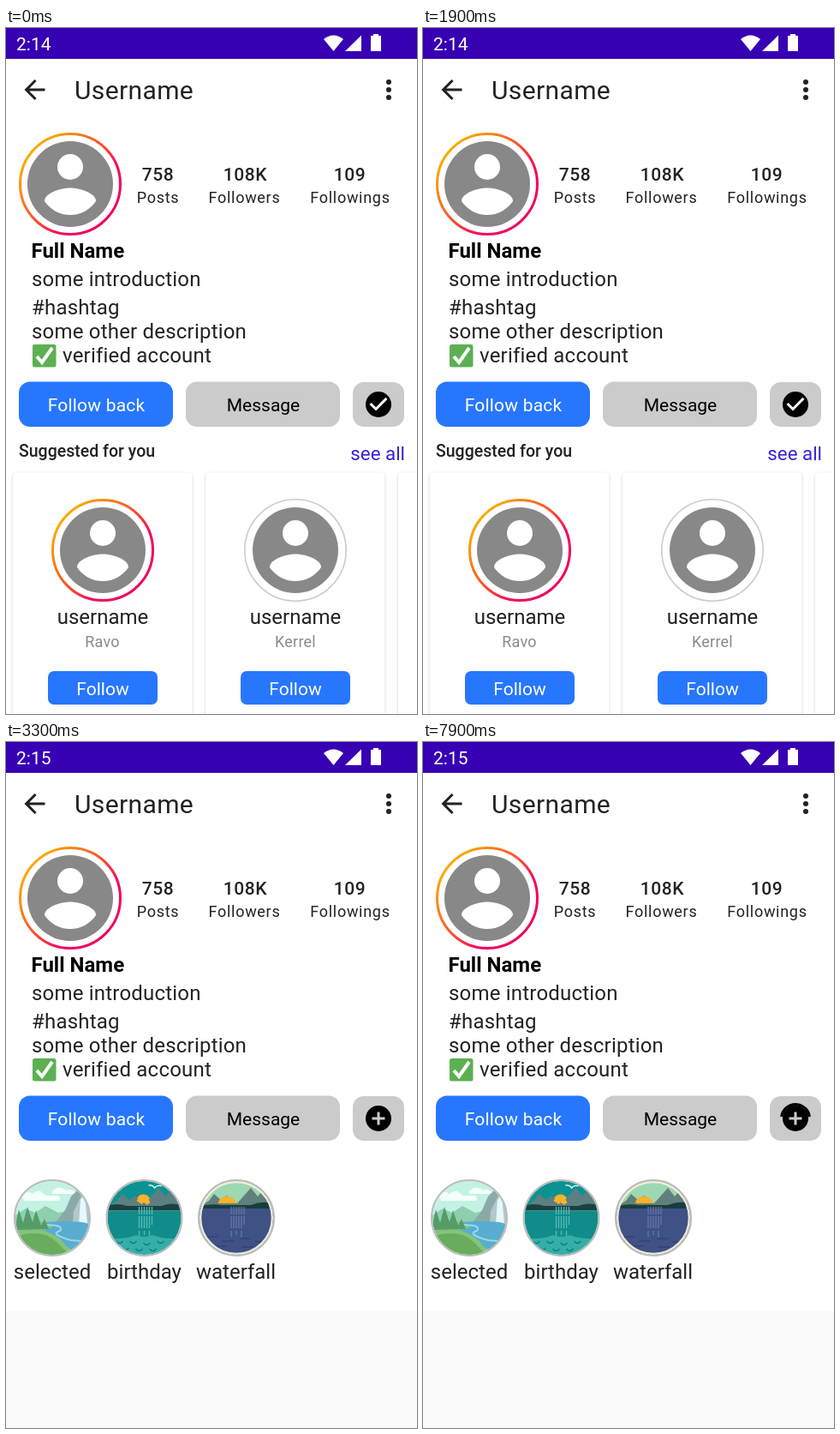
An HTML page that plays this animation: 480x800 px, repeating every 8 s.

```html
<!DOCTYPE html>
<html lang="en">
<head>
<meta charset="utf-8">
<title>Profile screen</title>
<style>
html, body { margin: 0; height: 100%; overflow: hidden; background: #fff; }
svg { display: block; width: 480px; height: 800px; font: 24px Roboto, sans-serif; fill: #222; }
.mid { text-anchor: middle; }
.num { font-size: 21px; font-weight: 500; letter-spacing: .6px; }
.cap { font-size: 18px; letter-spacing: .7px; }
.bio { letter-spacing: .2px; }
.btn { font-size: 21px; }
.sub { font-size: 18px; letter-spacing: .2px; fill: #8a8a8a; }
.blue { fill: #2777fe; }
.gray { fill: #cbcbcb; }
.white { fill: #fff; }
.card { fill: #fff; filter: drop-shadow(0 1px 1.5px #0003); }
.ring { fill: none; stroke: #bbb; stroke-width: 2; }
</style>
</head>
<body>
<svg viewBox="0 0 480 800">
  <defs>
    <linearGradient id="warm" x1=".1" y1=".15" x2=".9" y2=".85">
      <stop stop-color="#fcb000"/><stop offset=".5" stop-color="#fb4a30"/><stop offset=".75" stop-color="#f5055c"/><stop offset="1" stop-color="#f00060"/>
    </linearGradient>
    <clipPath id="disc"><circle r="43"/></clipPath>
    <g id="person">
      <circle r="50" fill="#888"/>
      <circle cy="-20" r="15" fill="#fff"/>
      <path d="M0 36c-12.5 0-23.5-6.4-30-16.1 .2-10 20-15.4 30-15.4s29.8 5.4 30 15.4C23.5 29.600 12.500 36 0 36z" fill="#fff"/>
    </g>
    <g id="story">
      <circle r="58.500" fill="none" stroke="url(#warm)" stroke-width="3"/>
      <use href="#person"/>
    </g>
    <g id="cardBody">
      <rect class="card" x="8" y="518.500" width="209.500" height="300" rx="4"/>
      <text class="mid" x="113" y="695">username</text>
      <rect class="blue" x="49" y="750" width="128" height="39" rx="7"/>
      <text class="mid btn white" x="113" y="778">Follow</text>
    </g>
    <g id="peaks">
      <path d="M-45-12l13-8 6-8 8 7 7-5 6 6 6 3 7-8 9-10 8 10 6-7 14 14v10h-90z"/>
    </g>
    <g id="falls" fill="none" stroke-width="1.300">
      <path d="M-6-13V22M-3-13V12M0-13V20M3-13V14M6-13V23M9-13V8" stroke-dasharray="9 2 14 3"/>
    </g>
  </defs>

  <rect width="480" height="800" fill="#fff"/>
  <rect width="480" height="36" fill="#3700b3"/>
  <text id="clock" class="btn white" x="12" y="26"></text>
  <path class="white" d="M371 13Q382.500 4 394 13L382.500 27zM415 8.500V27H396zM429 9v-2h6v2h3v18h-12v-18z"/>

  <path transform="translate(15.500 54) scale(1.500)" d="M20 11H7.830l5.590-5.590L12 4l-8 8 8 8 1.410-1.410L7.830 13H20z"/>
  <text x="80" y="83" font-size="30" letter-spacing=".375">Username</text>
  <circle cx="447" cy="63" r="3"/><circle cx="447" cy="72" r="3"/><circle cx="447" cy="81" r="3"/>

  <use href="#story" x="75" y="182"/>
  <g class="mid">
    <text class="num" x="177.500" y="178">758</text><text class="cap" x="177.500" y="204">Posts</text>
    <text class="num" x="279.500" y="178">108K</text><text class="cap" x="278.500" y="204">Followers</text>
    <text class="num" x="401.500" y="178">109</text><text class="cap" x="402" y="204">Followings</text>
  </g>
  <text x="29.500" y="268" font-weight="700" fill="#000">Full Name</text>
  <text class="bio" x="30" y="301">some introduction<tspan id="more">...<tspan fill="#888">more</tspan></tspan></text>

  <g id="bio" class="bio">
    <text x="30" y="334">#hashtag</text>
    <text x="30" y="362">some other description</text>
    <rect x="31" y="369" width="27.500" height="26.500" rx="2.500" fill="#5cb052"/>
    <path d="M36 383l6 7 12-17" fill="none" stroke="#fff" stroke-width="4"/>
    <text x="66" y="390">verified account</text>
  </g>

  <g id="below">
    <rect class="blue" x="15" y="412.500" width="180" height="52.500" rx="13"/>
    <text class="mid btn white" x="105.500" y="447" letter-spacing=".2">Follow back</text>
    <rect class="gray" x="210" y="412.500" width="180" height="52.500" rx="13"/>
    <text class="mid btn" x="300.500" y="447" fill="#000">Message</text>
    <rect class="gray" x="405" y="413" width="60" height="52" rx="13"/>
    <rect id="ripple" x="405" y="413" width="60" height="52" rx="13" fill="#000"/>
    <circle cx="435" cy="439" r="15" fill="#000"/>
    <path id="check" class="gray" style="fill:#f2f2f2" transform="translate(417 421) scale(1.500)" d="M10 17l-5-5 1.410-1.410L10 14.170l7.590-7.590L19 8z"/>
    <path id="plus" class="gray" transform="translate(417 421) scale(1.500)" d="M17 13h-4v4h-2v-4H7v-2h4V7h2v4h4z"/>
    <circle id="spinner" r="16.400" pathLength="1" fill="none" stroke="#000" stroke-width="3.200"/>

    <g id="suggested">
      <text x="15" y="500" font-size="19.500" font-weight="500">Suggested for you</text>
      <text x="466" y="503.500" font-size="22.300" text-anchor="end" fill="#3822d6">see all</text>
      <use href="#cardBody"/><use href="#cardBody" x="225"/><use href="#cardBody" x="450"/>
      <use href="#story" x="113" y="609"/>
      <text class="mid sub" x="112.500" y="722">Ravo</text>
      <circle cx="338" cy="609" r="59.200" fill="none" stroke="#ccc" stroke-width="1.600"/>
      <use href="#person" x="338" y="609"/>
      <text class="mid sub" x="338" y="722">Kerrel</text>
    </g>

    <g id="highlights">
      <rect y="663" width="480" height="240" fill="#fafafa"/>
      <g transform="translate(54 555)">
        <g clip-path="url(#disc)">
          <rect x="-45" y="-45" width="90" height="90" fill="#c3f2e5"/>
          <path d="M-35-25q5-8 12-3 8-8 15 2h15q5 5 0 6h-40zM0-31q8-8 16-1 8-3 12 4H0z" fill="#f3fffb"/>
          <path d="M-45-2l14-9 11 5 12-8 15 8 20-4V18h-72z" fill="#8fcfae"/>
          <path d="M4 5l11-14 7-16 8-8 15 2V16H12z" fill="#8ba9a8"/>
          <path d="M25-8l9-18 8 3 3 30H24z" fill="#b4c8c6"/>
          <path d="M31 8l2-29 5-6 3 35z" fill="#e4f9ff"/>
          <path d="M-45 5Q-10 0 8 12L45 18v27h-90z" fill="#83c47a"/>
          <path d="M-10 5Q40 2 45 9v28Q22 42 15 31T-13 14Q12 12-10 5z" fill="#58add0"/>
          <path d="M-9 8q24 0 18 7-13 4 13 11l22 2" fill="none" stroke="#9bd8e8" stroke-width="2"/>
          <path d="M-45 22Q-12 12 4 27t15 18h-64z" fill="#68ad5d"/>
          <path d="M-44 14l5-24 5 16 5-19 6 18 4-14 6 18 4-8 5 12z" fill="#569b68"/>
        </g>
        <circle class="ring" r="44"/>
      </g>
      <g transform="translate(161.500 555)">
        <g clip-path="url(#disc)">
          <rect x="-45" y="-45" width="90" height="90" fill="#108c8a"/>
          <path d="M-45-45h90v32h-90z" fill="#0c9292"/>
          <circle cx="-1" cy="-19" r="8.500" fill="#fbb12a"/>
          <use href="#peaks" fill="#5e7f82"/>
          <path d="M-9-20q8-13 16 2l-4 3-3-4-3 3z" fill="#fbb12a"/>
          <path d="M-45-14q12-4 25 0h40q12-5 25 0v5h-90z" fill="#174443"/>
          <use href="#falls" stroke="#55bcb7"/>
          <path d="M-45 23q22 3 35-3 10 4 20 0 15 6 35 3v25h-90z" fill="#35aea9"/>
          <path d="M-33 27q4 5 8 0m8 0q4 5 8 0m8 2q4 5 8 0m8-2q4 5 8 0M-26 35q4 5 8 0m8 1q4 5 8 0m8 0q4 5 8 0" fill="none" stroke="#117e7c" stroke-width="1.500"/>
          <path d="M5-38q5-1 7 3 3-4 8-2m-5-4q4 0 5 2 2-3 6-2" fill="none" stroke="#e9ffff" stroke-width="1.300"/>
        </g>
        <circle class="ring" r="44"/>
      </g>
      <g transform="translate(269 555)">
        <g clip-path="url(#disc)">
          <rect x="-45" y="-45" width="90" height="90" fill="#9dd8b2"/>
          <use href="#peaks" fill="#617f7b"/>
          <path d="M-21-17q1-8 10-8t11 8z" fill="#fbb12a"/>
          <path d="M-45-13q15-4 28-2h34q15-6 28-1v6h-90z" fill="#183d3e"/>
          <rect x="-45" y="-11" width="90" height="56" fill="#3f5185"/>
          <use href="#falls" stroke="#627ba6"/>
          <path d="M-34 22h12m5 5h14m7-3h13m5 4h9M-25 33h14m17 1h13" stroke="#304372" stroke-width="1.500"/>
          <circle r="42" fill="none" stroke="#f1eedc" stroke-width="2.500"/>
        </g>
        <circle class="ring" r="44"/>
      </g>
      <g class="mid"><text x="54" y="626">selected</text><text x="161.500" y="626">birthday</text><text x="268.500" y="626">waterfall</text></g>
    </g>
  </g>
  <circle id="touch" r="17" fill="#fff" fill-opacity=".6" stroke="#c3c3ec" stroke-width="2"/>
</svg>
<script>
const $ = id => document.getElementById(id);
const show = (id, on) => $(id).style.display = on ? '' : 'none';
const clamp = v => Math.max(0, Math.min(1, v));

// start, x, y, hold, fade (ms)
const taps = [[3000, 281, 292, 0, 300], [4600, 127, 461, 0, 300], [5100, 241, 443, 0, 300], [6100, 445, 443, 200, 1]];
const CUT = 2100, EXPAND = 3100, LOAD = 6300;

// cubic-bezier(.4, 0, .2, 1)
function ease(x) {
  let lo = 0, hi = 1, s;
  for (let i = 0; i < 20; i++) {
    s = (lo + hi) / 2;
    const bx = 1.2 * s * (1 - s) ** 2 + .6 * s * s * (1 - s) + s ** 3;
    if (bx < x) lo = s; else hi = s;
  }
  return s * s * (3 - 2 * s);
}

function spin(ms) {
  const p = ms % 1333 / 1333;
  const head = .75 * ease(clamp(2 * p)), tail = .75 * ease(clamp(2 * p - 1));
  const angle = 360 * (tail + p / 4) + ms / 4444 * 720 - 90;
  $('spinner').setAttribute('transform', `translate(435 439) rotate(${angle})`);
  $('spinner').setAttribute('stroke-dasharray', `${Math.max(0, head - tail)} 2`);
}

function draw(t) {
  const first = t < CUT, folded = !first && t < EXPAND, loading = t >= LOAD;
  $('clock').textContent = first ? '2:14' : '2:15';
  show('more', folded);
  show('bio', !folded);
  show('suggested', first);
  show('check', first);
  show('highlights', !first);
  show('plus', !first);
  $('below').setAttribute('transform', `translate(0 ${folded ? -89.5 : 0})`);

  const tap = taps.findLast(a => t >= a[0]);
  show('touch', tap);
  if (tap) {
    const [start, x, y, hold, fade] = tap;
    $('touch').setAttribute('transform', `translate(${x} ${y})`);
    $('touch').setAttribute('opacity', clamp(1 - (t - start - hold) / fade));
  }

  show('spinner', loading);
  $('ripple').setAttribute('opacity', loading ? .1 * clamp(1 - (t - LOAD) / 500) : 0);
  if (loading) spin(t - LOAD);
}

function tick() {
  draw(Math.floor(performance.now() % 8000 / 100) * 100);
  requestAnimationFrame(tick);
}
tick();
</script>
</body>
</html>
```
